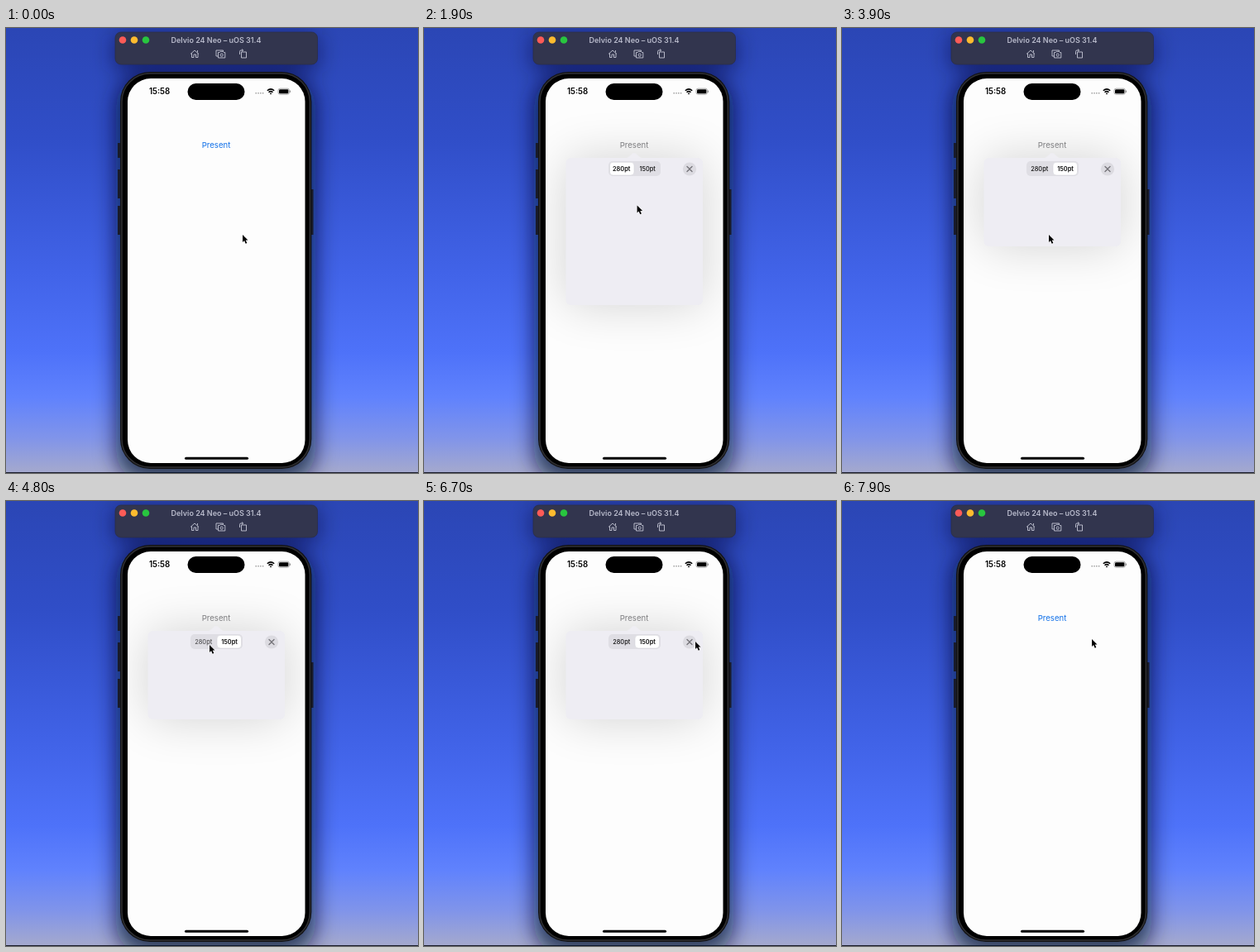
An HTML page that plays this animation: 498 by 538 pixels, repeating every 8 s.

```html
<!DOCTYPE html>
<html lang="en">
<head>
<meta charset="utf-8">
<title>Popover resizing</title>
<style>
  html, body { margin: 0; width: 100%; height: 100%; overflow: hidden; background: #3452cf; }
  svg { display: block; width: 498px; height: 538px; font-family: Inter, "Liberation Sans", sans-serif; }
  text { text-anchor: middle; }
</style>
</head>
<body>
<svg viewBox="0 0 498 538">
  <defs>
    <linearGradient id="sky" x1="0" y1="0" x2="0" y2="1">
      <stop offset="0" stop-color="#2b46b5"/>
      <stop offset=".25" stop-color="#304ec8"/>
      <stop offset=".55" stop-color="#4163e8"/>
      <stop offset=".73" stop-color="#4e72f9"/>
      <stop offset=".83" stop-color="#6082fd"/>
      <stop offset=".92" stop-color="#8094ea"/>
      <stop offset="1" stop-color="#a5a9cd"/>
    </linearGradient>
    <filter id="windowBlur" filterUnits="userSpaceOnUse" x="50" y="-60" width="400" height="700">
      <feGaussianBlur stdDeviation="13"/>
    </filter>
    <filter id="popoverBlur" filterUnits="userSpaceOnUse" x="50" y="40" width="410" height="420">
      <feGaussianBlur stdDeviation="29"/>
    </filter>
    <clipPath id="screen"><rect x="147" y="61" width="214.500" height="465" rx="28"/></clipPath>
  </defs>

  <rect width="498" height="538" fill="url(#sky)"/>
  <rect y="537" width="498" height="1" fill="#1a1c2c"/>
  <g filter="url(#windowBlur)" fill="#080c30">
    <rect x="133" y="58" width="241" height="490" rx="36" opacity=".72"/>
    <rect x="130" y="8" width="248" height="44" rx="8" opacity=".5"/>
  </g>

  <!-- Window bar -->
  <rect x="132" y="5" width="244.500" height="39" rx="7" fill="#32354e" stroke="#2b2e47" stroke-width=".8"/>
  <circle cx="141" cy="14.500" r="4.300" fill="#fc5b57"/>
  <circle cx="155" cy="14.500" r="4.300" fill="#fdbb2f"/>
  <circle cx="169" cy="14.500" r="4.300" fill="#28c63f"/>
  <text x="254" y="17.500" font-size="9" font-weight="600" fill="#b8bacb">Delvio 24 Neo – uOS 31.4</text>
  <g fill="none" stroke="#c5c7d5" stroke-width=".9" stroke-linejoin="round">
    <path d="M223 31.500l5-4.500 5 4.500M224.500 30.500v5h2.500v-3.500h2.500v3.500h2.500v-5M231.500 29.500v-2.500"/>
    <path d="M256 34h-2v-7h8.500v1.500M256.500 29.500h1.800l1-1.200h3l1 1.200h1.500v6.500h-8.300z"/>
    <circle cx="260.700" cy="32.600" r="1.600"/>
    <path d="M284.500 29h6v7h-6zM282.500 32v-3.500q0-1.500 1.500-1.500h2.500M285 25.500l1.700 1.500-1.700 1.500"/>
  </g>

  <!-- Device -->
  <path d="M136.500 139v18m0 14v35m0 9v35M370 195v55" stroke="#191b2a" stroke-width="3"/>
  <rect x="138" y="53" width="231.300" height="480" rx="36" fill="#121213"/>
  <rect x="140" y="55" width="227.300" height="476" rx="34" stroke="#303033" stroke-width="1.500"/>
  <rect x="147" y="61" width="214.500" height="465" rx="28" fill="#fdfdfd"/>

  <g clip-path="url(#screen)">
    <g id="popover">
      <rect id="shadow" x="171.500" y="157" width="165.500" rx="9" opacity=".17" filter="url(#popoverBlur)"/>
      <path d="M242 158q5-1 8.500-5 3.500-4 7 0 3.500 4 8.500 5z" fill="#efeef3"/>
      <rect id="panel" x="171.500" y="157" width="165.500" rx="6" fill="#eeedf3"/>
      <rect x="223" y="161" width="63" height="18" rx="5" fill="#dfdee4"/>
      <rect id="thumb" y="162.300" width="29.500" height="15.700" rx="4" fill="#fff" stroke="#cfced5" stroke-width=".5"/>
      <g font-size="7.400" fill="#111">
        <text id="tall" x="238.700" y="173">280pt</text>
        <text id="short" x="270.100" y="173">150pt</text>
      </g>
      <circle cx="321" cy="170.500" r="8.100" fill="#dcdbe1"/>
      <path d="M318 167.500l6 6m0-6l-6 6" stroke="#77767c" stroke-width="1.400" stroke-linecap="round"/>
    </g>
  </g>
  <text id="present" x="254" y="145" font-size="9.600">Present</text>

  <!-- Status bar -->
  <rect x="219.500" y="67" width="69" height="20" rx="10"/>
  <text x="185.500" y="80.300" font-size="9.700" font-weight="600">15:58</text>
  <path d="M301.500 78.800h10" stroke="#9b9b9b" stroke-width="1.400" stroke-dasharray="1.400 1.400"/>
  <path d="M315.800 75.800q4.200-3.800 8.400 0M317.500 77.700q2.500-2.200 5 0" fill="none" stroke="#000" stroke-width="1.500"/>
  <path d="M318.700 79q1.300-1 2.600 0l-1.300 1.400z"/>
  <rect x="329" y="73.200" width="13.400" height="7" rx="2.200" fill="none" stroke="#929292" stroke-width=".8"/>
  <rect x="330" y="74.200" width="11.400" height="5" rx="1.300"/>
  <path d="M343.500 75.500v2.400" stroke="#929292"/>
  <rect x="216" y="518.800" width="77" height="3" rx="1.500"/>

  <path id="cursor" d="M0 0V9L2 7.100 3.700 10.800 5.300 10.100 3.700 6.500H6.500Z" stroke="#fff" paint-order="stroke" stroke-linejoin="round"/>
</svg>
<script>
  const LOOP = 8000, STEP = 100;
  const OPEN = 1300, CLOSE = 7400;
  const TOGGLES = [3200, 4860, 5700];
  const HEIGHT = { tall: 178, short: 107 };

  const point = (x, y) => ({ x, y });
  const home = point(286, 250);
  const shortButton = point(269, 170);
  const moves = [
    { start: 200, end: 1100, to: point(246, 143) },
    { start: 1500, end: 1950, to: point(258, 217) },
    { start: 2200, end: 3000, to: shortButton },
    { start: 3300, end: 3700, to: point(250, 250) },
    { start: 4000, end: 4800, to: point(246, 174) },
    { start: 5300, end: 5700, to: shortButton },
    { start: 6250, end: 6700, to: point(328, 170) },
    { start: 6700, end: 7000, to: point(318, 167) },
    { start: 7450, end: 7900, to: point(302, 167) }
  ];

  const el = id => document.getElementById(id);
  const set = (id, attributes) => {
    for (const name in attributes) el(id).setAttribute(name, attributes[name]);
  };
  const mix = (a, b, u) => a + (b - a) * u;

  // Smooth 0 to 1 over a stretch of time.
  function progress(t, start, duration) {
    const u = Math.min(1, Math.max(0, (t - start) / duration));
    return u * u * (3 - 2 * u);
  }

  // Each toggle turns the value the other way: 0 is tall, 1 is short.
  const toggled = (t, delay, duration) => TOGGLES.reduce(
    (value, tap, i) => mix(value, (i + 1) % 2, progress(t, tap + delay, duration)), 0);

  const pointerAt = t => moves.reduce((from, { start, end, to }) => {
    const u = progress(t, start, end - start);
    return point(mix(from.x, to.x, u), mix(from.y, to.y, u));
  }, home);

  function draw(t) {
    const closing = progress(t, CLOSE, 400);
    const scale = progress(t, OPEN, 450);
    const opacity = progress(t, OPEN + 100, 200) * (1 - closing);
    const dim = progress(t, OPEN + 200, 300) * (1 - closing);
    const selection = toggled(t, 0, 280);
    const shortness = Math.max(1 - progress(t, OPEN + 180, 300), toggled(t, 60, 350));
    const height = mix(HEIGHT.tall, HEIGHT.short, shortness);
    const pressing = TOGGLES.some(tap => t < tap && t >= tap - STEP);
    const isShort = selection > .5;
    const { x, y } = pointerAt(t);

    set('cursor', { transform: `translate(${x} ${y})` });
    set('popover', { opacity, transform: `translate(254 150) scale(${scale}) translate(-254 -150)` });
    set('panel', { height });
    set('shadow', { height });
    set('thumb', { x: mix(224.5, 255, selection) });
    set('tall', { 'font-weight': isShort ? 500 : 600, opacity: pressing && isShort ? .68 : 1 });
    set('short', { 'font-weight': isShort ? 600 : 500, opacity: pressing && !isShort ? .68 : 1 });
    set('present', { fill: `rgb(${mix(16, 126, dim)} ${mix(112, 126, dim)} ${mix(232, 128, dim)})` });
  }

  const start = performance.now();
  function tick() {
    const t = (performance.now() - start) % LOOP;
    draw(Math.floor(t / STEP) * STEP);
    requestAnimationFrame(tick);
  }
  tick();
</script>
</body>
</html>
```
